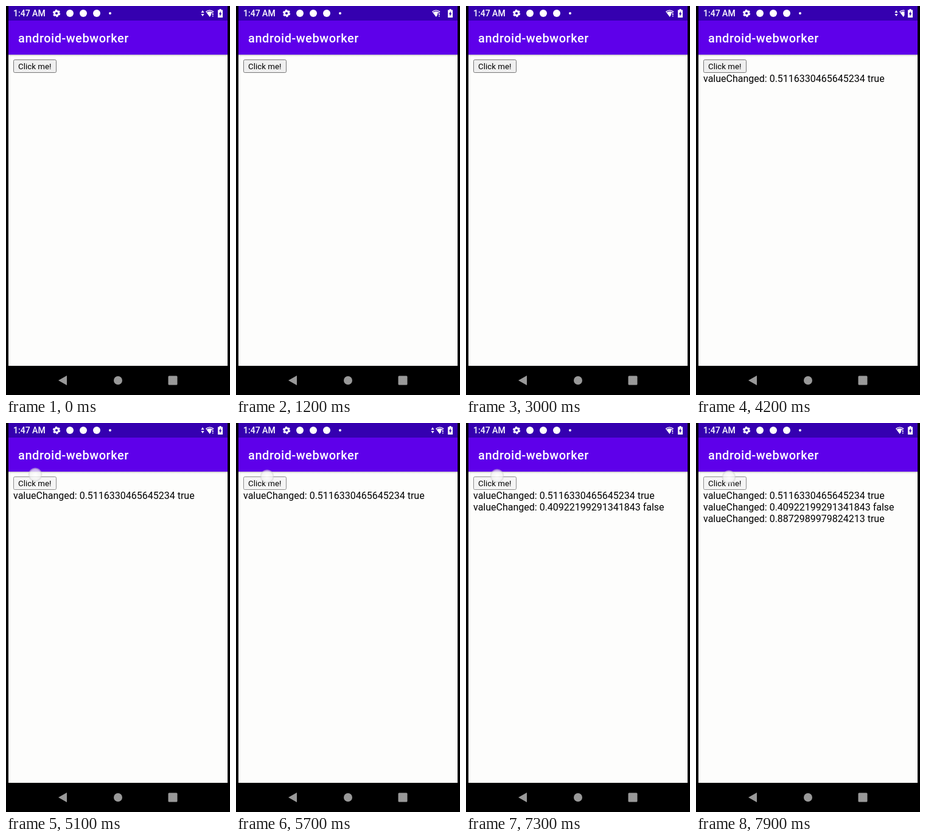
Animation of 368x640 px, one loop 8000 ms. Source, as an HTML page:

```html
<!DOCTYPE html>
<html lang="en">
<head>
<meta charset="utf-8">
<title>android-webworker</title>
<style>
  html, body { margin: 0; width: 100%; height: 100%; overflow: hidden; background: #000; }
  svg { display: block; width: 368px; height: 640px; font-family: Roboto, sans-serif; }
  .clock { font-size: 14px; font-weight: 500; }
  .title { font-size: 20px; font-weight: 500; letter-spacing: .55px; }
  .label { font-size: 13.333px; }
  .log { font-size: 16px; }
  #button rect { fill: #efefef; stroke: #767676; }
  #button.pressed rect { fill: #f5f5f5; stroke: #8d8d8d; }
</style>
</head>
<body>
<svg viewBox="0 0 368 640">
  <defs>
    <linearGradient id="shadow" x2="0" y2="1">
      <stop stop-color="#c4c4c4"/>
      <stop offset="1" stop-color="#fdfdfc"/>
    </linearGradient>
    <radialGradient id="glow">
      <stop stop-color="#fff" stop-opacity=".8"/>
      <stop offset=".7" stop-color="#f3f3f3" stop-opacity=".75"/>
      <stop offset=".86" stop-color="#d4d4d4" stop-opacity=".6"/>
      <stop offset="1" stop-color="#bbb" stop-opacity="0"/>
    </radialGradient>
    <clipPath id="signalArea"><path d="M316 0H342.5V24H316Z"/></clipPath>
  </defs>

  <path fill="#000" d="M0 0H368V640H0Z"/>
  <path fill="#fdfdfc" d="M4 80H364V592H4Z"/>
  <path fill="url(#shadow)" d="M4 80H364V83H4Z"/>
  <path fill="#5e00ea" d="M4 24H364V80H4Z"/>
  <path fill="#3500b0" d="M4 0H364V24H4Z"/>

  <g fill="#fff">
    <text class="clock" x="12" y="17">1:47 AM</text>
    <g fill="none" stroke="#fff">
      <circle cx="83" cy="12" r="3.5" stroke-width="2.8"/>
      <circle cx="83" cy="12" r="5.3" stroke-width="1.8" stroke-dasharray="3.2 2.35"/>
    </g>
    <circle cx="105" cy="12" r="6"/>
    <circle cx="127" cy="12" r="6"/>
    <circle cx="149" cy="12" r="6"/>
    <circle cx="171" cy="12" r="2"/>
    <g clip-path="url(#signalArea)">
      <g id="signal">
        <path id="arrows" d="M320.5 11L323 7L325.5 11ZM320.5 13H325.5L323 17Z"/>
        <path d="M328 9Q334.5 4 341.5 9L339.5 11.5L334.7 18Z"/>
        <path fill="none" stroke="#3500b0" stroke-width="1.4" d="M330 10Q334.5 6.800 339.500 10"/>
        <path fill="#3500b0" d="M337.500 11.500H342V18H336.500Z"/>
        <path d="M339 12H340.500V15H339ZM339 16H340.500V17.500H339Z"/>
      </g>
    </g>
    <path d="M350.500 5H353.500V6.500H356V19H348V6.500H350.500Z"/>
    <path fill="#3500b0" d="M352.800 8.500L349.800 13.500H351.500V17L354.300 12H352.800Z"/>
    <text class="title" x="20" y="60">android-webworker</text>
  </g>

  <g id="button">
    <rect x="12.5" y="88.5" width="70" height="21" rx="2"/>
    <text class="label" x="20" y="104">Click me!</text>
  </g>
  <g id="logs" class="log">
    <text x="12" y="125">valueChanged: 0.5116330465645234 true</text>
    <text x="12" y="144">valueChanged: 0.40922199291341843 false</text>
    <text x="12" y="163">valueChanged: 0.8872989979824213 true</text>
  </g>
  <circle id="touch" r="12" fill="url(#glow)"/>

  <g fill="#999">
    <path d="M86 616L100 608V624Z"/>
    <circle cx="184" cy="616" r="7"/>
    <rect x="266.5" y="608.5" width="15" height="15" rx="1.5"/>
  </g>
</svg>
<script>
  const LOOP = 8000, STEP = 100, SLIDE = 400;
  const logTimes = [3600, 5800, 7900];
  const taps = [
    { start: 2500, end: 3000, x: 50, y: 88 },
    { start: 3300, end: 3900, x: 51, y: 88 },
    { start: 4900, end: 5400, x: 48, y: 85 },
    { start: 5500, end: 6100, x: 51, y: 88 },
    { start: 7000, end: 7500, x: 51, y: 87 },
    { start: 7600, end: 8100, x: 54, y: 89 }
  ];
  // The data arrows come and go, and the signal icons slide into place.
  const slides = [
    { start: 1200, from: -6 },
    { start: 4200, from: 6 },
    { start: 7000, from: -6 }
  ];
  const [signal, arrows, button, logs, touch] =
    ["signal", "arrows", "button", "logs", "touch"].map(id => document.getElementById(id));
  const show = (el, on) => el.setAttribute("visibility", on ? "visible" : "hidden");

  function draw(t) {
    const slide = slides.findLast(s => t >= s.start);
    const left = slide ? Math.max(0, 1 - (t - slide.start) / SLIDE) : 0;
    signal.setAttribute("transform", `translate(${slide ? slide.from * left ** 2 : 0})`);
    show(arrows, !slide || slide.from > 0);

    [...logs.children].forEach((line, i) => show(line, t >= logTimes[i]));

    const tap = taps.find(p => t >= p.start && t < p.end);
    show(touch, tap);
    button.classList.toggle("pressed", !!tap);
    if (tap) {
      touch.setAttribute("cx", tap.x);
      touch.setAttribute("cy", tap.y);
      touch.setAttribute("opacity", Math.min(1, (t - tap.start + STEP) / 200, (tap.end - t) / 200));
    }
  }

  function tick() {
    draw(Math.floor(performance.now() % LOOP / STEP) * STEP);
    requestAnimationFrame(tick);
  }
  tick();
</script>
</body>
</html>
```
